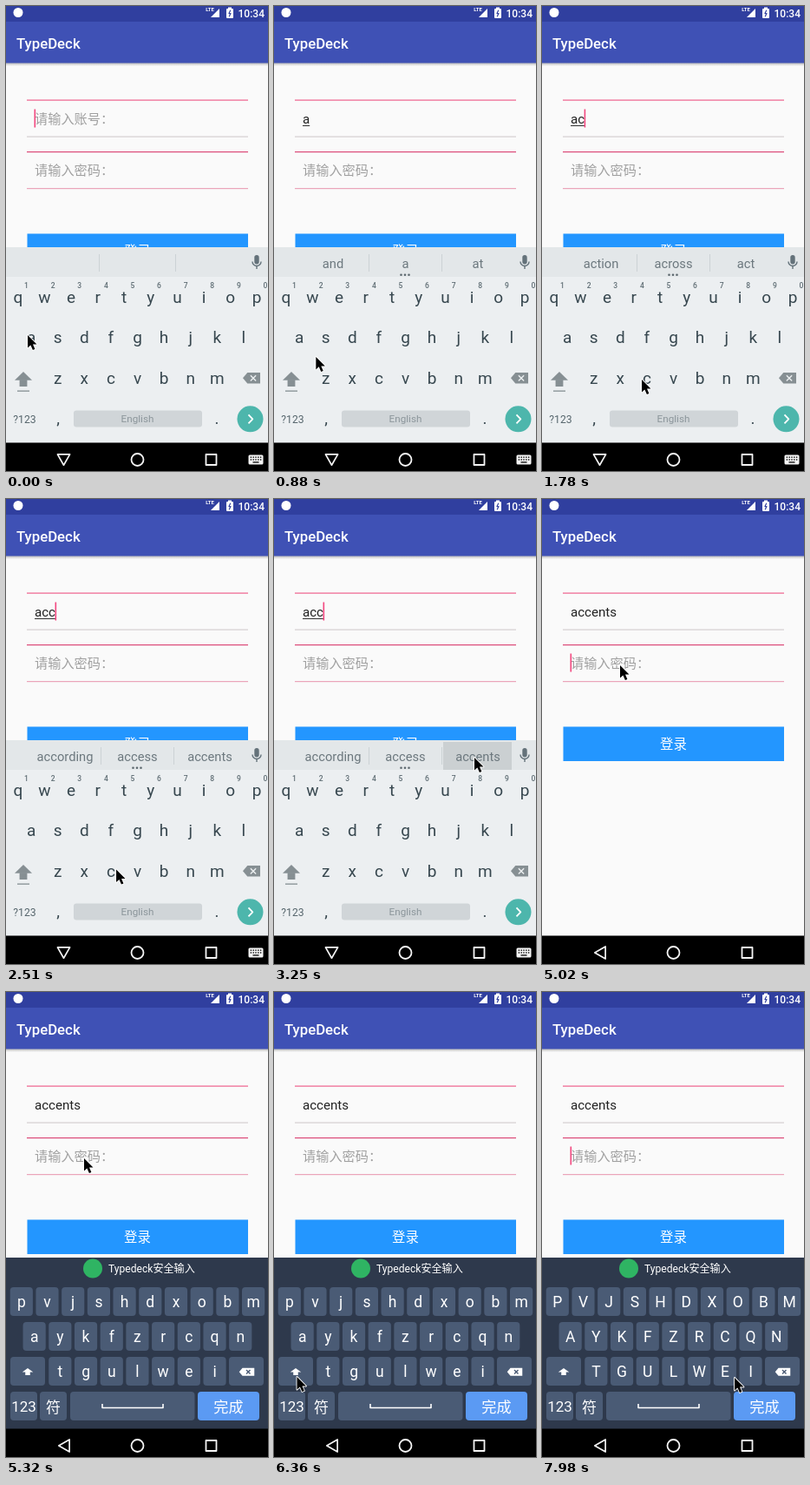
Write an HTML page with a canvas that moves like this. It is 302 px wide and 534 px high and loops after 8 s.

```html
<!DOCTYPE html>
<html lang="zh">
<head>
<meta charset="utf-8">
<style>
  html, body { margin: 0; width: 100%; height: 100%; overflow: hidden; background: #fafafa; }
  canvas { display: block; width: 302px; height: 534px; }
</style>
</head>
<body>
<canvas id="stage" width="302" height="534"></canvas>
<script>
const ctx = document.getElementById('stage').getContext('2d');
const LOOP = 8000, STEP = 147.8, LEAD = 12, BLINK = 500;
const CENTER = 151.5, LIGHT_PITCH = 30.6, DARK_PITCH = 29.7;
const LIGHT_ROWS = ['qwertyuiop', 'asdfghjkl', 'zxcvbnm'];
const DARK_ROWS = ['pvjshdxobm', 'aykfzrcqn', 'tgulwei'];
const PINK = '#f2477f', SLATE = '#37474f', GRAY = '#868f93', PALE = '#eceff1', KEY = '#4a5b75';

// Everything happens on whole steps of the clock.
const AT = { highlight: 22, pick: 23, focus: 33, hide: 34, dark: 36, upper: 45 };
const FOCUS_TIME = 4800;
const WORD = 'accents';
const PRESSES = [{ at: 1, key: 'a' }, { at: 11, key: 'c' }, { at: 14, key: 'c' }];
const SUGGESTIONS = {
  a: ['and', 'a', 'at'],
  ac: ['action', 'across', 'act'],
  acc: ['according', 'access', WORD]
};
const STOPS = [
  { leave: 0, arrive: 0, x: 25, y: 378 },
  { leave: 4, arrive: 10, x: 115, y: 429 },
  { leave: 16, arrive: 21, x: 231, y: 297 },
  { leave: 24, arrive: 32, x: 90, y: 191 },
  { leave: 37, arrive: 43, x: 26.5, y: 442 },
  { leave: 45, arrive: 54, x: 222, y: 443 }
];

function rect(x, y, w, h, color) {
  ctx.fillStyle = color;
  ctx.fillRect(x, y, w, h);
}

function round(x, y, w, h, r, color) {
  ctx.fillStyle = color;
  ctx.beginPath();
  ctx.roundRect(x, y, w, h, r);
  ctx.fill();
}

function disc(x, y, r, color) {
  round(x - r, y - r, 2 * r, 2 * r, r, color);
}

function path(points, closed) {
  ctx.beginPath();
  points.forEach(([x, y]) => ctx.lineTo(x, y));
  if (closed) ctx.closePath();
}

function poly(points, color) {
  path(points, true);
  ctx.fillStyle = color;
  ctx.fill();
}

function line(points, color, width, closed = false) {
  path(points, closed);
  ctx.strokeStyle = color;
  ctx.lineWidth = width;
  ctx.stroke();
}

function ring(x, y, r, color, width, end = Math.PI * 2) {
  ctx.beginPath();
  ctx.arc(x, y, r, 0, end);
  ctx.strokeStyle = color;
  ctx.lineWidth = width;
  ctx.stroke();
}

function triangle(x, y, r, angle, color) {
  const corner = i => angle + i * Math.PI * 2 / 3;
  line([0, 1, 2].map(i => [x + r * Math.cos(corner(i)), y + r * Math.sin(corner(i))]), color, 1.7, true);
}

function text(str, x, y, size, color, align = 'center', weight = 400) {
  ctx.font = `${weight} ${size}px Roboto, "Noto Sans CJK SC", "Noto Sans CJK", sans-serif`;
  ctx.textAlign = align;
  ctx.fillStyle = color;
  ctx.fillText(str, x, y);
  return ctx.measureText(str).width;
}

function shiftIcon(x, top, w, h, color) {
  const neck = top + h * 0.57, stem = w * 0.44;
  poly([[x, top], [x + w / 2, neck], [x - w / 2, neck]], color);
  rect(x - stem / 2, neck - 0.5, stem, top + h - neck + 0.5, color);
}

function deleteIcon(x, y, w, h, color, cross) {
  const left = x - w / 2, right = x + w / 2, top = y - h / 2, low = y + h / 2;
  poly([[left, y], [left + h * 0.42, top], [right, top], [right, low], [left + h * 0.42, low]], color);
  const arm = h / 4, cx = x + w * 0.1;
  for (const d of [arm, -arm]) line([[cx - arm, y - d], [cx + arm, y + d]], cross, 1.4);
}

function drawHeader() {
  rect(0, 0, 302, 18, '#303f9f');
  disc(14, 7.5, 5.5, '#fff');
  text('LTE', 235, 6, 6, '#fff', 'center', 700);
  poly([[246, 3], [246, 13], [236, 13]], '#fff');
  round(254, 3, 8, 11, 1, '#fff');
  rect(256, 1.5, 4, 2, '#fff');
  line([[258.8, 4.8], [257, 8.6], [259, 8.6], [257.2, 12.2]], '#303f9f', 1.2);
  text('10:34', 298, 12.5, 12, '#fff', 'right', 500);

  const shade = ctx.createLinearGradient(0, 65, 0, 69);
  shade.addColorStop(0, 'rgba(0,0,0,.28)');
  shade.addColorStop(1, 'rgba(0,0,0,0)');
  rect(0, 65, 302, 4, shade);
  rect(0, 18, 302, 47.5, '#3f51b5');
  text('TypeDeck', 12, 49, 16.8, '#fff', 'left', 500);
}

function entryAt(step) {
  if (step >= AT.pick) return { value: WORD, since: AT.pick };
  const done = PRESSES.filter(p => p.at < step);
  return {
    value: done.map(p => p.key).join(''),
    since: done.length ? done.at(-1).at + 1 : 0
  };
}

function drawField(top, hint, value, caretOn) {
  let width = 0;
  if (value) {
    width = text(value, 33, top + 27, 15.1, '#222', 'left');
    if (value !== WORD) rect(33, top + 29, width, 1, '#333');
  } else {
    text(hint, 33, top + 27, 15.2, '#a0a0a0', 'left');
  }
  if (caretOn) rect(32.5 + width, top + 10.5, 1.6, 21, PINK);
}

function drawForm(step, entry) {
  const edges = ['#f0628e', '#d6d0d2', '#dc4a78', '#eba5ba'];
  edges.forEach((color, i) => rect(24, 107.5 + (i >> 1) * 59.5 + (i % 2) * 42, 255, 1.2, color));

  const focused = step >= AT.focus;
  const epoch = focused ? FOCUS_TIME : entry.since * STEP;
  const caretOn = Math.floor((step * STEP - epoch) / BLINK) % 2 === 0;
  drawField(108, '请输入账号：', entry.value, caretOn && !focused);
  drawField(167, '请输入密码：', '', caretOn && focused);

  rect(24.5, 261.5, 254.5, 39.5, '#2396ff');
  text('登录', CENTER, 287, 15.4, '#fff');
}

function drawSuggestions(words, step) {
  rect(0, 277, 302, 34, '#e3e7e9');
  if (step === AT.highlight) rect(195, 279, 79, 32, '#cbd0d2');
  const gap = words.length ? 42 : 44;
  for (const side of [-1, 1]) rect(151 + side * gap, 285, 1, 20, '#ccd2d5');
  words.forEach((word, i) => {
    text(word, 68 + i * 83.5, 301, 14.7, '#6c787e');
    disc(146.5 + i * 4.5, 308.7, 1.3, '#5c686e');
  });

  const mic = '#64727a';
  round(286.3, 286, 5.4, 10.5, 2.7, mic);
  ring(289, 293.5, 5, mic, 1.4, Math.PI);
  rect(288.3, 298.5, 1.4, 3.5, mic);
}

function keySpot(key) {
  const row = LIGHT_ROWS.findIndex(letters => letters.includes(key));
  const letters = LIGHT_ROWS[row];
  return {
    x: CENTER + (letters.indexOf(key) - (letters.length - 1) / 2) * LIGHT_PITCH,
    y: 341 + Math.floor(row * 46.5)
  };
}

function drawPopup(key) {
  const { x, y } = keySpot(key);
  ctx.save();
  ctx.shadowColor = 'rgba(0,0,0,.3)';
  ctx.shadowBlur = 3;
  ctx.shadowOffsetY = 1;
  round(x - 19, y - 75, 38, 44, 2, '#f5f7f8');
  ctx.restore();
  text(key, x, y - 46, 24, SLATE);
}

function drawLightKeys(step, words) {
  rect(0, 311, 302, 191, PALE);
  drawSuggestions(words, step);
  const press = PRESSES.find(p => p.at === step);
  if (press) {
    const { x, y } = keySpot(press.key);
    rect(x - 15, y - 29, LIGHT_PITCH, 45, '#d5dadd');
  }

  for (const key of LIGHT_ROWS.join('')) {
    const { x, y } = keySpot(key);
    text(key, x, y, 19, SLATE);
  }
  for (let i = 0; i < 10; i++) {
    text((i + 1) % 10, 23.5 + i * LIGHT_PITCH, 324, 8.5, '#5f6d74', 'center', 500);
  }

  shiftIcon(20, 420, 20, 17, GRAY);
  rect(13, 441.5, 14, 1.3, GRAY);
  deleteIcon(283, 427.3, 20, 12.6, GRAY, PALE);

  text('?123', 21.5, 479, 12.2, '#56656c');
  text(',', 60, 480, 19, SLATE);
  text('.', 243, 480, 19, SLATE);
  round(78, 464.5, 148, 19, 3, '#d0d5d8');
  text('English', CENTER, 478.3, 11.7, '#8c969b');
  disc(281.5, 474.3, 15, '#4db6ac');
  line([[279.5, 469.3], [284.3, 474.3], [279.5, 479.3]], '#fff', 1.8);
  if (press) drawPopup(press.key);
}

function drawKey(x, y, w, label, size = 17.5, color = KEY) {
  round(x, y, w, 33, 4, color);
  if (label) text(label, x + w / 2, y + 16.5 + size * 0.36, size, '#fff');
}

function drawDarkKeys(upper) {
  rect(0, 305, 302, 197, '#2e394c');
  disc(100, 317.5, 11, '#2fb463');
  text('Typedeck安全输入', 118, 322, 12.1, '#fff', 'left');

  DARK_ROWS.forEach((letters, row) => [...letters].forEach((ch, i) => {
    const x = CENTER + 1.7 + (i - letters.length / 2) * DARK_PITCH;
    drawKey(x, 339 + row * 40, 26.2, upper ? ch.toUpperCase() : ch);
  }));

  drawKey(5, 419, 40);
  shiftIcon(25, 432, 12.5, 8, '#fff');
  drawKey(257, 419, 40);
  deleteIcon(277.5, 436.3, 17.5, 9, '#fff', KEY);

  drawKey(5, 459, 31, '123', 17);
  drawKey(39, 459, 31);
  text('符', 54.5, 483, 17, '#fff');
  drawKey(74, 459, 143.5);
  line([[111, 473], [111, 477.5], [181, 477.5], [181, 473]], '#fff', 1.6);
  drawKey(221, 459, 71, '', 17, '#5b9af3');
  text('完成', 256.5, 483, 17.2, '#fff');
}

function drawNav(light) {
  const white = '#f4f4f4';
  rect(0, 501.5, 302, 33, '#000');
  if (light) triangle(66.5, 519, 8.2, Math.PI / 2, white);
  else triangle(69, 521, 8.2, Math.PI, white);
  ring(CENTER, 521, 7, white, 1.8);
  ctx.strokeRect(230.5, 515, 12, 12);
  if (!light) return;
  round(279.5, 515.5, 17, 11, 1.5, white);
  for (let i = 0; i < 10; i++) {
    rect(281.7 + (i % 5) * 2.8, 517.5 + (i >> 2 > 1 || i > 4 ? 2.8 : 0), 1.4, 1.4, '#000');
  }
  rect(284.5, 523.3, 7, 1.3, '#000');
}

// Eased travel between stops, sagging like a hand's sweep.
function pointerAt(step) {
  const i = Math.max(1, STOPS.findLastIndex(s => s.leave <= step));
  const from = STOPS[i - 1], to = STOPS[i];
  const u = Math.min(1, Math.max(0, (step - to.leave) / (to.arrive - to.leave)));
  const ease = u * u * (3 - 2 * u);
  const dx = to.x - from.x, dy = to.y - from.y;
  return [from.x + dx * ease, from.y + dy * ease + Math.abs(dx) * 0.15 * Math.sin(Math.PI * u)];
}

function drawPointer(step) {
  const [x, y] = pointerAt(step);
  const shape = [[0, 0], [0, 14.5], [3.4, 11.4], [5.9, 17], [8.4, 16], [6, 10.6], [10.5, 10.6]]
    .map(([dx, dy]) => [x + dx, y + dy]);
  line(shape, '#fff', 1.8, true);
  poly(shape, '#000');
}

function draw(time) {
  const step = Math.floor((time % LOOP + LEAD) / STEP);
  const entry = entryAt(step);
  const light = step < AT.hide;
  rect(0, 0, 302, 534, '#fafafa');
  drawHeader();
  drawForm(step, entry);
  if (light) {
    ctx.save();
    if (step === AT.focus) {
      ctx.globalAlpha = 0.5;
      ctx.translate(0, 40);
    }
    drawLightKeys(step, SUGGESTIONS[entry.value] || []);
    ctx.restore();
  } else if (step >= AT.dark) {
    drawDarkKeys(step >= AT.upper);
  }
  drawNav(light);
  drawPointer(step);
}

ctx.lineJoin = 'round';
const begin = performance.now();
function tick() {
  draw(performance.now() - begin);
  requestAnimationFrame(tick);
}
tick();
</script>
</body>
</html>
```
